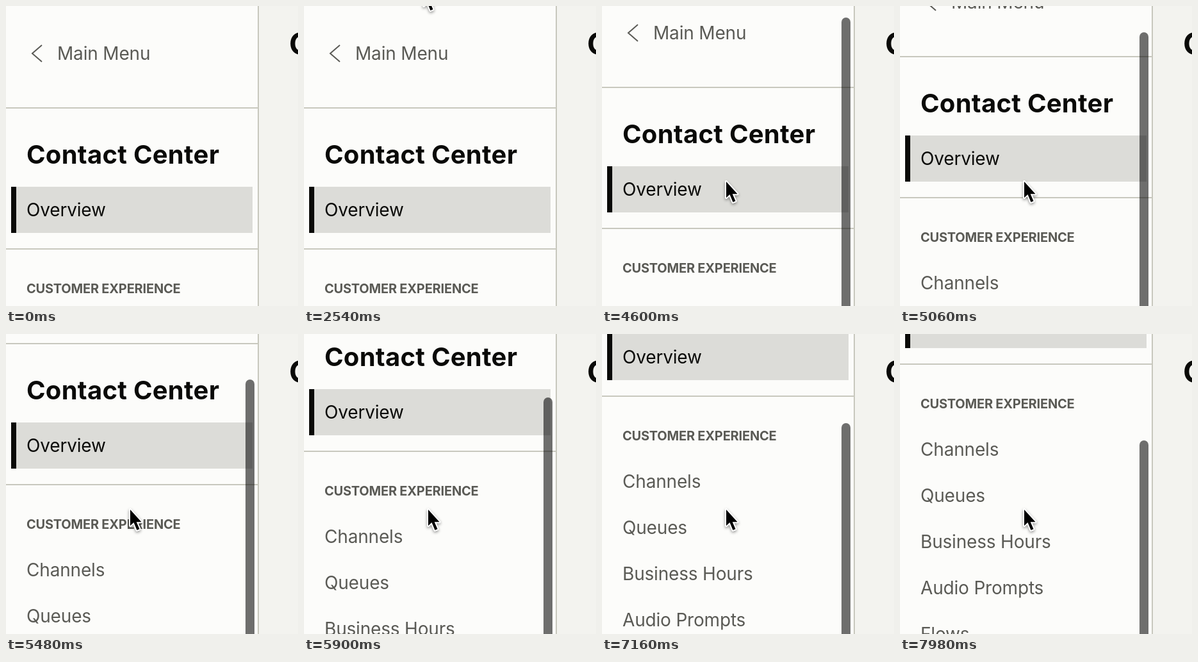
These frames come from a looping animation (456x468 px, 8 s). An HTML page:

```html
<!DOCTYPE html>
<html lang="en">
<head>
<meta charset="utf-8">
<title>Sidebar scroll</title>
<style>
  html, body { margin: 0; width: 100%; height: 100%; overflow: hidden; background: #fcfcfa; }
  svg { display: block; width: 456px; height: 468px; }
  text {
    font: 400 28px Inter, sans-serif; font-optical-sizing: none;
    letter-spacing: -.18px; fill: #5a5a55;
  }
  .title { font-size: 40px; font-weight: 700; letter-spacing: .27px; fill: #0a0a08; }
  .page { font-size: 48px; font-weight: 700; fill: #0a0a08; }
  .group { font-size: 20px; font-weight: 700; letter-spacing: -.2px; }
  .active { fill: #0a0a08; }
  .rule { fill: #c8c8be; }
  #cursor { filter: drop-shadow(0 2px 2px rgba(0, 0, 0, .4)); }
</style>
</head>
<body>
<svg viewBox="0 0 456 468">
  <rect width="456" height="468" fill="#fcfcfa"/>
  <g id="menu">
    <path d="M56 61 41 74 56 87" fill="none" stroke="#5a5a55" stroke-width="2"/>
    <text x="80" y="84">Main Menu</text>
    <rect class="rule" y="158" width="393" height="2"/>
    <text class="title" x="32" y="246">Contact Center</text>
    <rect x="8" y="282" width="377" height="72" fill="#dcdcd8"/>
    <rect x="8" y="282" width="8" height="72" fill="#0a0a08"/>
    <text class="active" x="32" y="328">Overview</text>
    <rect class="rule" y="378" width="393" height="2"/>
    <text class="group" x="32" y="448">CUSTOMER EXPERIENCE</text>
    <text x="32" y="522">Channels</text>
    <text x="32" y="594">Queues</text>
    <text x="32" y="666">Business Hours</text>
    <text x="32" y="738">Audio Prompts</text>
    <text x="32" y="810">Flows</text>
  </g>
  <rect id="thumb" x="374" width="14" height="600" rx="7" fill-opacity=".56"/>
  <rect x="395" width="61" height="468" fill="#f3f3ef"/>
  <rect class="rule" x="393" width="2" height="468"/>
  <text class="page" x="442" y="76">Contact Center</text>
  <g id="cursor">
    <path d="M0 0V25L5.5 20 10.5 32 14.5 30.3 9.7 19.2H17.5Z"
      fill="#000" stroke="#fff" stroke-width="4" stroke-linejoin="round" paint-order="stroke"/>
  </g>
</svg>
<script>
const LOOP = 8000;
const [menu, thumb, cursor] = ['menu', 'thumb', 'cursor'].map(id => document.getElementById(id));

// Two scroll strokes: [step, offset, slope]
const curve = [
  [86, 0, 0], [96, 32, 4], [107, 80, 4.5],
  [125, 196, 2], [152, 282, 5.5], [169, 332, 1]
];

// Three steps per 140 ms: 20, 20 and 100 ms long
function stepAt(ms) {
  const q = ms - 120, k = Math.floor(q / 140), r = q - k * 140;
  return 3 * k + (r < 20 ? 0 : r < 40 ? 1 : 2);
}

function scrollAt(n) {
  if (n <= curve[0][0]) return 0;
  const i = Math.max(1, curve.findIndex(p => n <= p[0]));
  const [a, ya, ma] = curve[i - 1], [b, yb, mb] = curve[i];
  const h = b - a, u = (n - a) / h, v = 1 - u;
  const y = (1 + 2 * u) * v * v * ya + u * v * v * h * ma
          + u * u * (3 - 2 * u) * yb - u * u * v * h * mb;
  return 2 * Math.round(y / 2);
}

function move(el, x, y) {
  el.setAttribute('transform', `translate(${x} ${y})`);
}

function draw(ms) {
  const n = stepAt(ms), y = scrollAt(n);
  move(menu, 0, -y);
  // The thumb trails the content by one step
  move(thumb, 0, Math.round(4 + scrollAt(n - 1) * 0.49));
  thumb.style.display = y > 0 ? '' : 'none';

  const left = 1 - Math.min(1, Math.max(0, (n - 53) / 25));
  const rest = left * left;
  move(cursor, 194 - 7 * rest, 274 - 299 * rest);
  cursor.style.display = n < 53 ? 'none' : '';
}

const start = performance.now();
function tick() {
  draw((performance.now() - start) % LOOP);
  requestAnimationFrame(tick);
}
draw(0);
requestAnimationFrame(tick);
</script>
</body>
</html>
```
